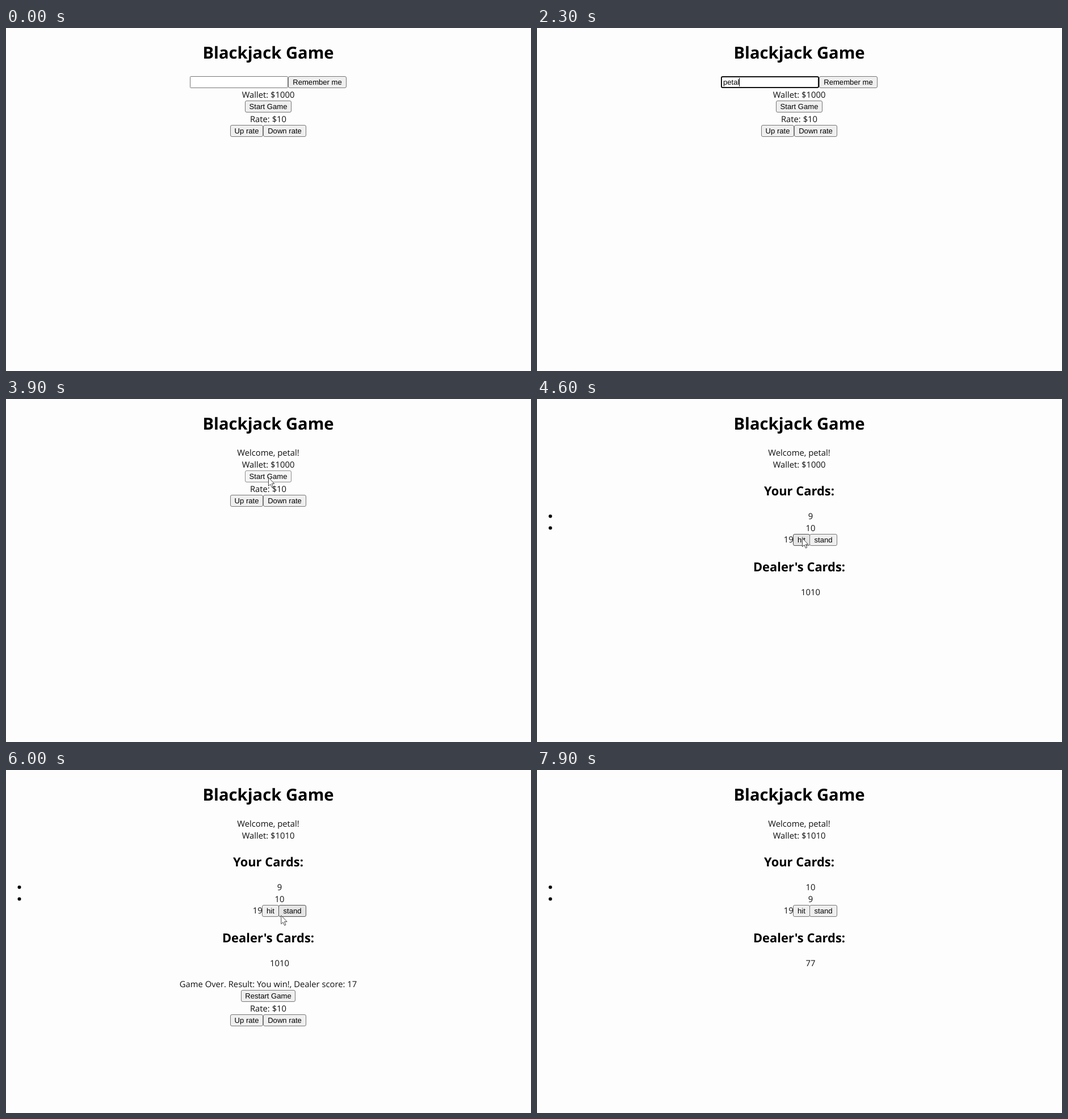
These frames come from a looping animation (925 by 605 pixels, 8000 ms). An HTML page:

```html
<!DOCTYPE html>
<html lang="en">
<head>
<meta charset="utf-8">
<title>Blackjack Game</title>
<style>
  html, body { margin: 0; width: 100%; height: 100%; overflow: hidden; background: #fdfdfd; }
  svg { display: block; width: 925px; height: 605px; text-rendering: geometricPrecision; }
  text { font: 14.8px "Open Sans", "Noto Sans", sans-serif; text-anchor: middle; fill: #111; white-space: pre; }
  .h1 { font-size: 29.2px; font-weight: 700; fill: #000; }
  .h2 { font-size: 21.9px; font-weight: 700; fill: #000; }
  .ui { font: 13.1px "Liberation Sans", Arial, sans-serif; fill: #000; }
  .left { text-anchor: start; }
  .btn rect { fill: #efefef; stroke: #767676; }
  .hover rect { fill: #e5e5e5; stroke: #4f4f4f; }
  .active rect { fill: #f5f5f5; stroke: #8d8d8d; }
  .field { fill: #fff; stroke: #767676; }
  .focus { stroke: #101010; stroke-width: 2; }
</style>
</head>
<body>
<svg id="stage" viewBox="0 0 925 605"></svg>
<script>
const LOOP = 8000, STEP = 100, MID = 462;
const USER = 'petal';
const KEYS = [1500, 1600, 1900, 2100, 2300];

// Pointer stops: time, x, y
const PATH = [
  [0, 592, 172], [100, 592, 172], [600, 470, 95], [2700, 470, 95],
  [3100, 557, 97], [3400, 557, 97], [3900, 462, 138], [4000, 462, 138],
  [4600, 467, 245], [5000, 468, 246], [5100, 468, 246], [5600, 485, 252],
  [5900, 485, 252], [6900, 459, 397], [7400, 459, 397], [7900, 461, 298], [8000, 461, 298]
];
const PRESSES = [[3200, 3300], [3900, 4000], [5600, 5800], [7200, 7300]];
// Spans in which the pointer is over text and not drawn
const HIDDEN = [[0, 200], [500, 2900], [7900, 8000]];

const within = (spans, t) => spans.some(([a, b]) => t >= a && t < b);

function pointerAt(t) {
  const i = PATH.findIndex(p => p[0] > t);
  const [t0, x0, y0] = PATH[i - 1], [t1, x1, y1] = PATH[i];
  const u = (t - t0) / (t1 - t0), k = u * u * (3 - 2 * u);
  return { x: x0 + (x1 - x0) * k, y: y0 + (y1 - y0) * k };
}

const text = (s, y, cls = '', x = MID) => `<text class="${cls}" x="${x}" y="${y}">${s}</text>`;

function scene(t) {
  const mouse = pointerAt(t), shown = !within(HIDDEN, t), down = within(PRESSES, t);

  function button(label, x, y, w) {
    const over = shown && mouse.x >= x && mouse.x <= x + w && mouse.y >= y && mouse.y <= y + 20;
    const state = over ? (down ? 'active' : 'hover') : '';
    return `<g class="btn ${state}"><rect x="${x}" y="${y}" width="${w}" height="20" rx="2.5"/>` +
      text(label, y + 14.5, 'ui', x + w / 2) + '</g>';
  }

  const rateControls = y => text('Rate: $10', y) +
    button('Up rate', 395.5, y + 5.5, 57) + button('Down rate', 453.5, y + 5.5, 75);

  function field(focus) {
    const inset = focus ? 1 : 0.5;
    return `<rect class="field ${focus ? 'focus' : ''}" x="${324 + inset}" y="${85 + inset}"
      width="${173 - 2 * inset}" height="${21 - 2 * inset}" rx="${2 * inset}"/>`;
  }

  function login() {
    const typed = KEYS.filter(k => k <= t).length;
    const focus = t >= 700 && t < 3200;
    const lastInput = Math.max(700, ...KEYS.filter(k => k <= t));
    const caret = focus && (t - lastInput) % 1000 < 500;
    const widths = [0, 7.3, 14.6, 18.2, 25.5, 28.4];
    return field(focus) +
      text(USER.slice(0, typed), 100, 'ui left', 328) +
      (caret ? `<rect x="${Math.round(328 + widths[typed])}" y="88" width="1" height="15"/>` : '') +
      button('Remember me', 497.5, 85.5, 102) +
      text('Wallet: $1000', 122.5) +
      button('Start Game', 421.5, 128.5, 81) + rateControls(166);
  }

  const greeting = wallet => text(`Welcome, ${USER}!`, 100) + text('Wallet: $' + wallet, 121);

  const lobby = () => greeting(1000) + button('Start Game', 421.5, 126.5, 81) + rateControls(164);

  const table = (wallet, cards, dealer) => greeting(wallet) +
    text('Your Cards:', 169.5, 'h2') +
    cards.map((c, i) => `<circle cx="23.5" cy="${206.7 + i * 20.7}" r="3"/>` +
      text(c, 212 + i * 20.7, '', 482)).join('') +
    text('19', 253, '', 443.3) +
    button('hit', 451.5, 238.5, 29) + button('stand', 480.5, 238.5, 48) +
    text("Dealer's Cards:", 303.5, 'h2') + text(dealer, 346, '', 482);

  const result = () => text('Game Over. Result: You win!, Dealer score: 17', 382.5) +
    button('Restart Game', 414.5, 388.5, 95) + rateControls(426);

  const view = t < 3300 ? login()
    : t < 4000 ? lobby()
    : t < 5800 ? table(1000, [9, 10], '1010')
    : t < 7300 ? table(1010, [9, 10], '1010') + result()
    : table(1010, [10, 9], '77');

  const arrow = shown ? `<path transform="translate(${mouse.x.toFixed(1)} ${mouse.y.toFixed(1)})"
    d="M.5 .5V15.5L3.9 12.4L6.4 18L8.7 17L6.3 11.5H10.8Z" fill="#fff" stroke="#333" stroke-width=".9"/>` : '';

  return text('Blackjack Game', 53.5, 'h1') + view + arrow;
}

const stage = document.getElementById('stage');
let last = -1;
function tick() {
  const t = Math.floor((performance.now() % LOOP) / STEP) * STEP;
  if (t !== last) stage.innerHTML = scene(last = t);
  requestAnimationFrame(tick);
}
tick();
</script>
</body>
</html>
```
